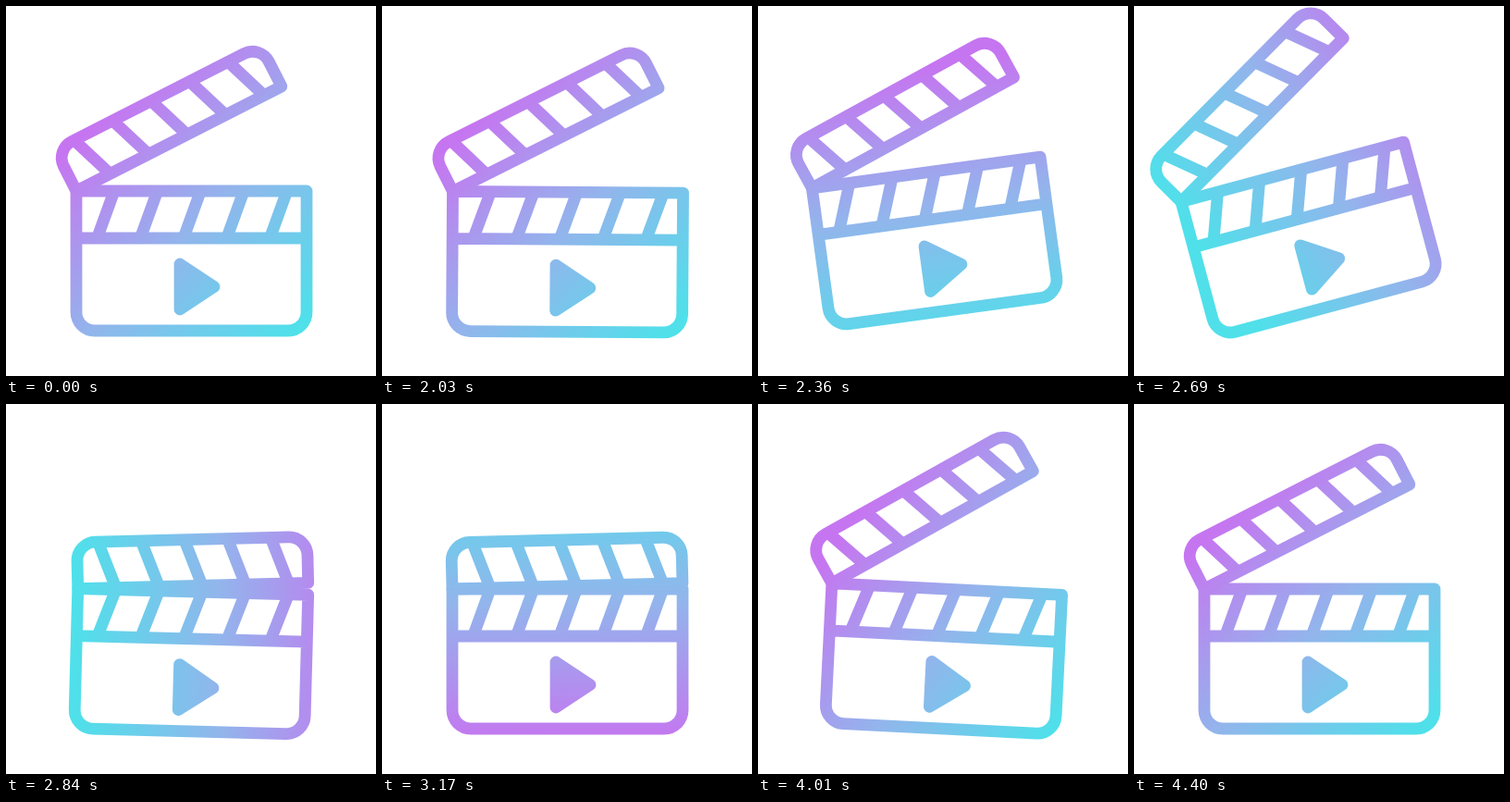
These frames come from a looping animation (400x400 px, 4430 ms). An HTML page with a canvas:

```html
<!DOCTYPE html>
<html lang="en">
<head>
<meta charset="utf-8">
<title>Clapperboard</title>
<style>
  html, body { margin: 0; overflow: hidden; background: #fff; }
  canvas { display: block; }
</style>
</head>
<body>
<canvas id="stage" width="400" height="400"></canvas>
<script>
const LOOP = 4430, START = 2030, STEP = 30;
const ctx = document.getElementById('stage').getContext('2d');

// Progress helpers: linear 0 to 1, eased 0 to 1, and 0 to 1 and back.
const ramp = (t, from, to) => Math.min(1, Math.max(0, (t - from) / (to - from)));
const move = (t, from, to) => {
  const u = ramp(t, from, to);
  return u * u * (3 - 2 * u);
};
const bump = (t, from, to) => Math.sin(Math.PI * ramp(t, from, to)) ** 2;
const rad = degrees => degrees * Math.PI / 180;

function poseAt(t) {
  const drop = move(t, 2670, 2860);
  const lift = move(t, 2130, 2430) * (1 - drop);
  const turn = move(t, 2150, 2570);
  const windUp = bump(t, 2000, 2300), clap = bump(t, 2770, 3090);

  const openArm = (27 - 8 * bump(t, 2150, 2570) + 4 * turn) * (1 - move(t, 2670, 2880));
  const bounce = 3.5 * bump(t, 2890, 3250);
  const reopen = 27 * move(t, 3800, 4060) + 8.5 * bump(t, 3800, 4330);

  return {
    x: -10 * lift,
    y: -24 * lift + 13 * windUp + 9 * clap + 10 * bump(t, 3650, 3900),
    tilt: -15.5 * turn * (1 - drop) + 4 * windUp + 5 * clap + 5 * bump(t, 3690, 4130),
    arm: -(openArm + bounce + reopen),
    hue: 45 + 313 * ramp(t, 2000, 3450) ** 1.55 + 47 * move(t, 3640, 4150)
  };
}

// The hinge is the origin of all shapes.
const boardPath = new Path2D(
  'M0 0H249V131a20 20 0 0 1-20 20H20a20 20 0 0 1-20-20ZM0 51H249');
const armPath = new Path2D(
  'M0 0H249V30a20 20 0 0 1-20 20H20a20 20 0 0 1-20-20Z');
const playPath = new Path2D('M112 79L149 103.5L112 128Z');
const stripes = new Path2D();
for (let i = 0; i < 5; i++) {
  stripes.moveTo(41 + 46.7 * i, 0);
  stripes.lineTo(22.5 + 46.7 * i, 51);
}

function draw(t) {
  const pose = poseAt(t);
  ctx.resetTransform();
  ctx.globalCompositeOperation = 'source-over';
  ctx.clearRect(0, 0, 400, 400);
  ctx.lineWidth = 12.8;
  ctx.lineJoin = 'round';
  ctx.fillStyle = ctx.strokeStyle = '#000';

  ctx.translate(200.5 + pose.x, 275.5 + pose.y);
  ctx.rotate(rad(pose.tilt));
  ctx.translate(-124.5, -75.5);
  ctx.stroke(boardPath);
  ctx.stroke(stripes);
  ctx.fill(playPath);
  ctx.stroke(playPath);

  ctx.rotate(rad(pose.arm));
  ctx.scale(1, -1);
  ctx.stroke(armPath);
  ctx.stroke(stripes);

  // Tint everything with the turning gradient.
  const dx = 155 * Math.cos(rad(pose.hue)), dy = 155 * Math.sin(rad(pose.hue));
  const tint = ctx.createLinearGradient(230 - dx, 213 - dy, 230 + dx, 213 + dy);
  tint.addColorStop(0, '#c675f0');
  tint.addColorStop(.5, '#92b5ec');
  tint.addColorStop(1, '#4fe0ea');
  ctx.resetTransform();
  ctx.globalCompositeOperation = 'source-in';
  ctx.fillStyle = tint;
  ctx.fillRect(0, 0, 400, 400);
}

const origin = performance.now();
function tick() {
  const t = (performance.now() - origin) % LOOP;
  draw(t < START ? 0 : START + Math.floor((t - START) / STEP) * STEP);
  requestAnimationFrame(tick);
}
tick();
</script>
</body>
</html>
```
